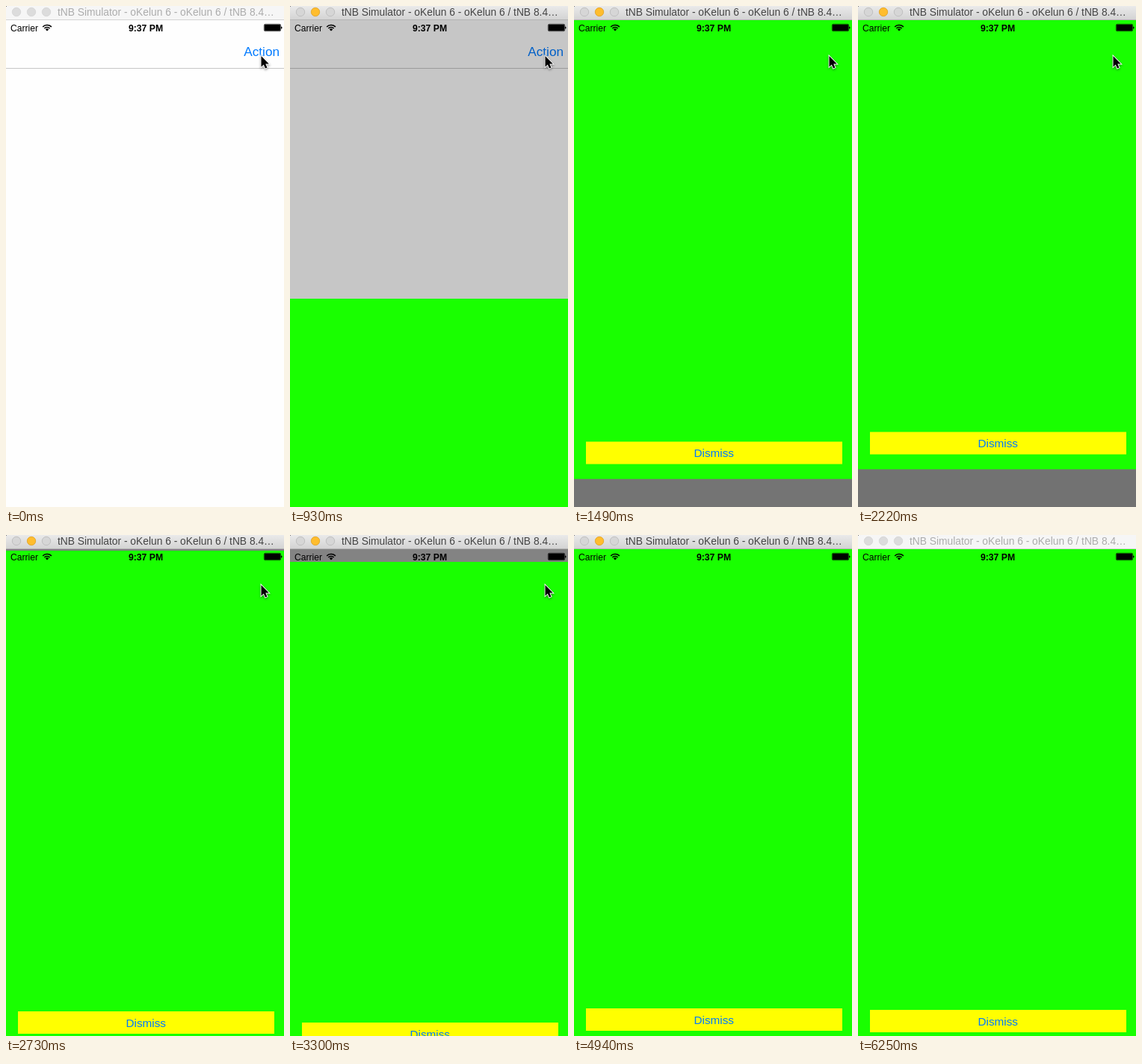
Recreate the animation shown at these times as an HTML page with a canvas. Size 372 px wide and 671 px high, loop 6350 ms.

```html
<!DOCTYPE html>
<html lang="en">
<head>
<meta charset="utf-8">
<title>Spring sheet</title>
<style>
html, body { margin: 0; width: 100%; height: 100%; overflow: hidden; background: #fefefe; }
canvas { display: block; width: 372px; height: 671px; }
</style>
</head>
<body>
<canvas id="stage" width="372" height="671"></canvas>
<script>
const ctx = document.getElementById('stage').getContext('2d');
const W = 372, H = 671, LOOP = 6350;
const TOP = 19, SHEET_H = 667;
const FONT = '"Liberation Sans", Arial, sans-serif';

// Screen refreshes come in runs: first change, last change, number of changes.
const RUNS = [
  [470, 1100, 12], [1160, 1770, 12], [1830, 2450, 12], [2500, 3130, 12],
  [3240, 3830, 11], [3890, 4520, 12], [4580, 5210, 12], [5270, 5270, 1], [6250, 6250, 1]
];

function refreshTime(t) {
  let shown = 0;
  for (const [start, end, count] of RUNS) {
    if (t < start) break;
    const step = count > 1 ? (end - start) / (count - 1) : 0;
    const index = step ? Math.min(count - 1, Math.floor((t - start) / step + 0.2)) : 0;
    shown = start + index * step;
  }
  return shown;
}

// Underdamped spring with damping ratio 0.5, released from rest.
function sheetOffset(t) {
  if (t >= 5270) return 0;
  const phase = 0.00237 * (Math.min(t, 2730) - 495) + 0.002225 * Math.max(0, t - 2730);
  if (phase <= 0) return SHEET_H;
  const decay = Math.exp(-phase / Math.sqrt(3));
  return SHEET_H * 2 / Math.sqrt(3) * decay * Math.sin(phase + Math.PI / 3);
}

function rect(x, y, w, h, color) {
  ctx.fillStyle = color;
  ctx.fillRect(x, y, w, h);
}

function text(str, x, y, size, color, align = 'left', weight = 'normal') {
  ctx.font = `${weight} ${size}px ${FONT}`;
  ctx.textAlign = align;
  ctx.fillStyle = color;
  ctx.fillText(str, x, y);
}

function drawPage() {
  rect(0, TOP, W, H - TOP, '#fefefe');
  rect(0, 83, W, 1, '#c6c6c6');
  text('Action', 366, 67, 17.2, '#007aff', 'right');
}

function drawSheet(offset) {
  const y = Math.round(offset * 2) / 2;
  rect(0, TOP, W, H - TOP, `rgba(0,0,0,${0.5 * (1 - offset / SHEET_H)})`);
  rect(0, TOP + y, W, SHEET_H, '#19ff00');
  rect(16, 636 + y, 343, 30, '#ffff00');
  text('Dismiss', 187.2, 656.5 + y, 15.3, '#007aff', 'center');
}

function drawStatus() {
  text('Carrier', 6, 33.5, 12.1, '#000');
  text('9:37 PM', 187, 33.5, 12.2, '#000', 'center', 'bold');

  ctx.strokeStyle = '#000';
  ctx.lineWidth = 1.6;
  for (const radius of [5, 8]) {
    ctx.beginPath();
    ctx.arc(55, 33.5, radius, -Math.PI * 0.76, -Math.PI * 0.24);
    ctx.stroke();
  }
  ctx.fillStyle = '#000';
  ctx.beginPath();
  ctx.moveTo(55, 33.5);
  ctx.arc(55, 33.5, 3, -Math.PI * 0.76, -Math.PI * 0.24);
  ctx.fill();

  ctx.lineWidth = 0.7;
  ctx.beginPath();
  ctx.roundRect(345.3, 24.3, 22.4, 9.4, 1.8);
  ctx.stroke();
  ctx.beginPath();
  ctx.roundRect(346, 25, 21, 8, 1);
  ctx.fill();
  ctx.beginPath();
  ctx.arc(368, 29, 1.6, -Math.PI / 2, Math.PI / 2);
  ctx.fill();
}

function drawTitleBar(active) {
  let fill = '#f6f6f6';
  if (active) {
    fill = ctx.createLinearGradient(0, 0, 0, TOP);
    fill.addColorStop(0, '#eaeaea');
    fill.addColorStop(1, '#d2d2d2');
  }
  rect(0, 0, W, TOP, fill);
  rect(0, TOP - 1, W, 1, active ? '#b3b3b3' : '#d3d3d3');
  rect(0, 0, 1, 1, '#777');

  [14, 34, 54].forEach((x, i) => {
    const lit = active && i === 1;
    ctx.beginPath();
    ctx.arc(x, 8, 5.7, 0, Math.PI * 2);
    ctx.fillStyle = lit ? '#ffbd2e' : active ? '#d6d6d6' : '#dcdcdc';
    ctx.fill();
    ctx.strokeStyle = lit ? '#dfa023' : active ? '#b9b9b9' : '#d3d3d3';
    ctx.lineWidth = 0.8;
    ctx.stroke();
  });
  text('tNB Simulator - oKelun 6 - oKelun 6 / tNB 8.4…', 69, 13, 13.8, active ? '#444' : '#acacac');
}

function drawCursor(t) {
  const p = Math.min(1, Math.max(0, (t - 3950) / 670));
  if (p === 1) return;
  const eased = p * p * (3 - 2 * p);
  ctx.save();
  ctx.translate(341 + 24 * eased, 66.5 + 623 * eased);
  ctx.beginPath();
  [[0.5, 0.5], [0.5, 15], [3.8, 11.9], [6, 17], [8.5, 15.9], [6.3, 11], [10.8, 11]]
    .forEach(([x, y]) => ctx.lineTo(x, y));
  ctx.closePath();
  ctx.save();
  ctx.shadowColor = 'rgba(0,0,0,0.4)';
  ctx.shadowBlur = 3;
  ctx.shadowOffsetY = 1.5;
  ctx.strokeStyle = '#fff';
  ctx.lineWidth = 1.8;
  ctx.stroke();
  ctx.restore();
  ctx.fillStyle = '#000';
  ctx.fill();
  ctx.restore();
}

function draw(t) {
  drawPage();
  const offset = sheetOffset(t);
  if (offset < SHEET_H) drawSheet(offset);
  drawStatus();
  drawTitleBar(t >= 470 && t < 6250);
  drawCursor(t);
}

const begin = performance.now();
function tick() {
  draw(refreshTime((performance.now() - begin) % LOOP));
  requestAnimationFrame(tick);
}
tick();
</script>
</body>
</html>
```
